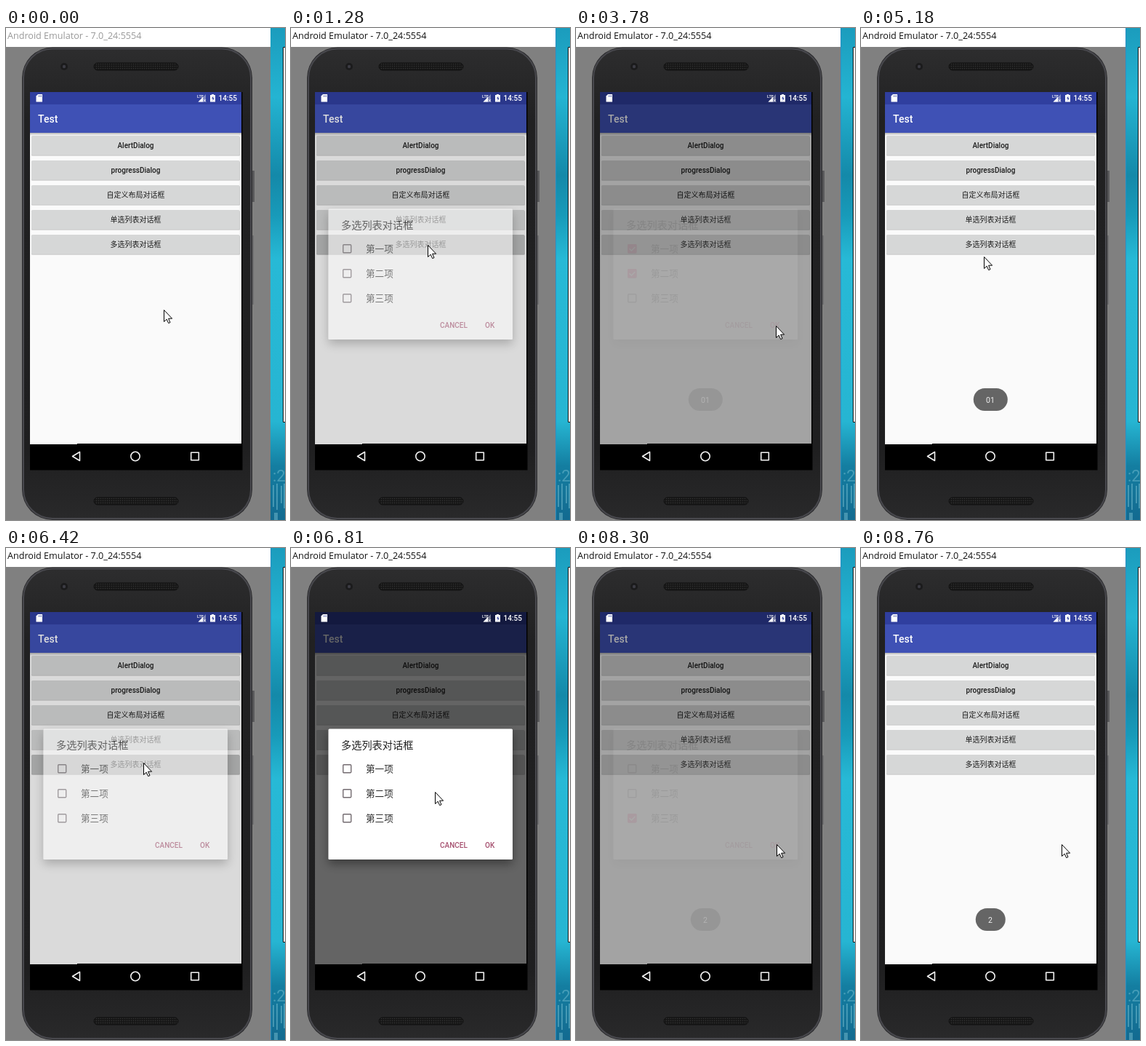
An HTML page that plays this animation: 384 by 676 pixels, repeating every 9390 ms.

```html
<!DOCTYPE html>
<html lang="zh">
<head>
<meta charset="utf-8">
<title>Dialog demo</title>
<style>
  html, body { margin: 0; width: 100%; height: 100%; overflow: hidden; background: #808080; }
  svg { display: block; width: 384px; height: 676px; font-family: Roboto, "Noto Sans CJK SC", "Noto Sans CJK", sans-serif; }
  .medium { font-weight: 500; }
  .mid { text-anchor: middle; }
</style>
</head>
<body>
<svg viewBox="0 0 384 676">
  <defs>
    <linearGradient id="sea" x2="0" y2="1">
      <stop offset="0" stop-color="#1b9cbd"/>
      <stop offset=".14" stop-color="#24b4d2"/>
      <stop offset=".3" stop-color="#1489a9"/>
      <stop offset=".38" stop-color="#189ab9"/>
      <stop offset=".47" stop-color="#27b9d6"/>
      <stop offset=".8" stop-color="#26b5d2"/>
      <stop offset=".89" stop-color="#147ea1"/>
      <stop offset="1" stop-color="#136a90"/>
    </linearGradient>
    <linearGradient id="case" x2="0" y2="1">
      <stop offset="0" stop-color="#2d2d2e"/>
      <stop offset=".15" stop-color="#212122"/>
      <stop offset=".85" stop-color="#1f1f20"/>
      <stop offset="1" stop-color="#29292a"/>
    </linearGradient>
    <linearGradient id="barShadow" x2="0" y2="1">
      <stop offset="0" stop-opacity=".28"/>
      <stop offset="1" stop-opacity="0"/>
    </linearGradient>
    <pattern id="mesh" width="3" height="3" patternUnits="userSpaceOnUse">
      <rect width="3" height="3" fill="#161616"/>
      <circle cx="1.5" cy="1.5" r=".8" fill="#343434"/>
    </pattern>
    <filter id="lift" x="-20%" y="-20%" width="140%" height="150%">
      <feDropShadow dx="0" dy="6" stdDeviation="7" flood-opacity=".4"/>
    </filter>
  </defs>

  <!-- desktop and window -->
  <rect x="364" width="20" height="676" fill="url(#sea)"/>
  <g fill="#8fd0df" opacity=".4">
    <text x="367" y="623" font-size="22">:2</text>
    <path d="M367 628h2v30h-2zM372 626h2v36h-2zM378 629h2v24h-2zM382 626h2v34h-2zM369 666h5v10h-5z"/>
  </g>
  <path d="M384 26.5H381.5V541.5H384" fill="#fff" stroke="#111"/>
  <rect width="364" height="676" fill="#808080"/>
  <rect width="364" height="26" fill="#fff"/>
  <rect id="edge" x="364" width="1" height="676" fill="#2b8fc4"/>
  <text id="caption" x="2" y="15" font-size="12.600" font-family="Open Sans, Noto Sans, sans-serif">Android Emulator - 7.0_24:5554</text>

  <!-- phone -->
  <path d="M338 196h4v43h-4z" fill="#58585a"/>
  <path d="M338 285h3v95h-3z" fill="#6c6c6e"/>
  <rect x="22" y="26.500" width="317" height="649.500" rx="42" fill="#29292b"/>
  <rect x="24" y="28.500" width="313" height="645.500" rx="40" fill="url(#case)" stroke="#48484d" stroke-width="2"/>
  <circle cx="80" cy="53" r="5" fill="#1b1b1c"/>
  <circle cx="80" cy="53" r="2.200" fill="#3c3c44"/>
  <rect x="121" y="48" width="116" height="10" rx="5" fill="url(#mesh)" stroke="#111"/>
  <rect x="121" y="645" width="116" height="10" rx="5" fill="url(#mesh)" stroke="#111"/>

  <!-- screen -->
  <rect x="33" y="88" width="292.500" height="519.500"/>
  <path d="M33 88H324V571H98V572H33Z" fill="#fafafa"/>
  <rect x="33" y="144" width="291" height="4" fill="url(#barShadow)"/>
  <rect x="33" y="105" width="291" height="39" fill="#3f51b5"/>
  <rect x="33" y="88" width="291" height="17" fill="#303f9f"/>
  <text x="44" y="130" font-size="14" fill="#fff" class="medium">Test</text>
  <g id="buttons" font-size="10" fill="#1d1d1d" class="mid medium"></g>
  <rect id="dim" x="33" y="88" width="291" height="484"/>
  <g fill="#fff">
    <path d="M44 91h6v10.500h-8.500v-8z"/>
    <path d="M45 92.500v2M46.800 92.500v2M48.500 92.500v2" stroke="#303f9f" stroke-width=".8"/>
    <text x="263" y="95.500" font-size="5.500" class="medium">LTE</text>
    <path d="M275 91v10.500h-10.500z" opacity=".4"/>
    <path d="M271 95v6.500h-6.500z"/>
    <path d="M272 98l3 3.500M275 98l-3 3.500" stroke="#fff" stroke-width=".8"/>
    <path d="M283 91h3v1h2v9.500h-7v-9.500h2z"/>
    <path d="M285.200 93.500l-2 3.500h1.400v3l2-3.800h-1.400z" fill="#303f9f"/>
    <text x="292.500" y="100" font-size="10" class="medium">14:55</text>
  </g>
  <g fill="none" stroke="#f4f4f4" stroke-width="1.600" stroke-linejoin="round">
    <path d="M91.500 588.500l10-6v12z"/>
    <circle cx="178" cy="588.500" r="6.200"/>
    <rect x="254.700" y="583.200" width="10.600" height="10.600"/>
  </g>

  <!-- dialog -->
  <g id="dialog">
    <rect x="51.500" y="248.500" width="253.500" height="179.500" rx="1.500" fill="#fff" filter="url(#lift)"/>
    <rect id="touched" x="52" y="286" width="253" height="34" fill="#fafafa"/>
    <text x="69" y="276" font-size="14.200" fill="#222">多选列表对话框</text>
    <g id="rows" font-size="12.600" fill="#2a2a2a"></g>
    <g font-size="10" class="medium" fill="#a6506f">
      <text x="205" y="412">CANCEL</text>
      <text id="ok" x="267" y="412">OK</text>
    </g>
  </g>

  <g id="toast">
    <rect id="pill" y="495" height="31" rx="15.500" fill="#656565"/>
    <text id="message" x="178" y="514.500" font-size="10.500" fill="#f2f2f2" class="mid"></text>
  </g>
  <path id="cursor" d="M.5 .5V16.500L4.200 13.200L6.700 18.600L9 17.600L6.600 12.200H11.600Z" fill="#fff" stroke="#000" stroke-linejoin="round"/>
</svg>

<script>
const LOOP = 9390;
const $ = id => document.getElementById(id);
const clamp = v => Math.max(0, Math.min(1, v));

const bursts = [
  [110, 980, 12], [1210, 1920, 10], [2070, 2530, 7], [2700, 3480, 11],
  [3780, 4080, 5], [4540, 5010, 7], [5180, 5330, 3], [5480, 6250, 11],
  [6420, 6890, 7], [7120, 7910, 11], [8230, 8610, 6], [8760, 8760, 1]
];

// Pointer path: time, x, y
const pointer = [
  [0, 217, 387], [60, 217, 387], [450, 205, 345], [820, 188, 298], [1300, 188, 298],
  [1560, 224, 344], [1850, 199, 304], [2070, 199, 304], [2530, 155, 335],
  [2780, 155, 337], [3250, 262, 415], [3480, 275, 409], [4500, 275, 409],
  [4620, 268, 423], [4900, 160, 338], [5010, 177, 320], [5180, 169, 314],
  [5330, 164, 304], [5480, 166, 303], [5900, 189, 295], [6500, 189, 295],
  [6880, 203, 360], [7200, 203, 362], [7650, 268, 411], [7800, 276, 407], [LOOP, 276, 407]
];

const sessions = [
  { open: 1210, close: 3780, checks: [2070, 2700, Infinity], ok: 3400 },
  { open: 6420, close: 8230, checks: [Infinity, Infinity, 7120], ok: 7750 }
];
const toasts = [
  { text: "01", width: 47, start: 3780, rise: 300, end: 5750 },
  { text: "2", width: 41, start: 8230, rise: 500, end: Infinity }
];

$("buttons").innerHTML = ["AlertDialog", "progressDialog", "自定义布局对话框", "单选列表对话框", "多选列表对话框"]
  .map((label, i) => `<g transform="translate(0 ${148 + 34 * i})">
    <rect x="35" y="1" width="287" height="26.800" rx="1.500" opacity=".2"/>
    <rect x="35" width="286.500" height="26.500" rx="1.500" fill="#d6d7d7"/>
    <text x="178.500" y="17.200">${label}</text></g>`).join("")
  + `<rect id="press" x="35" y="284" width="286.500" height="27.500" rx="1.500" fill="#000"/>`;

$("rows").innerHTML = ["第一项", "第二项", "第三项"]
  .map((label, i) => `<g transform="translate(71 ${297 + 34 * i})">
    <rect x=".7" y=".7" width="11" height="11" rx="1" fill="none" stroke="#736b70" stroke-width="1.400"/>
    <g class="tick"><rect width="12.500" height="12.500" rx="1.500" fill="#ff4081"/>
    <path d="M2.500 6.300l2.800 2.800 5-5.200" fill="none" stroke="#fff" stroke-width="1.400"/></g>
    <text x="32" y="10.800">${label}</text></g>`).join("");
const ticks = document.querySelectorAll(".tick");

function snap(t) {
  const burst = bursts.findLast(b => b[0] <= t);
  if (!burst) return 0;
  const [start, end, count] = burst;
  if (t >= end) return end;
  const step = (end - start) / (count - 1);
  return start + Math.floor((t - start) / step + 1e-6) * step;
}

function pointerAt(t) {
  const i = pointer.findLastIndex(k => k[0] <= t);
  const a = pointer[i], b = pointer[i + 1] || a;
  const p = (t - a[0]) / (b[0] - a[0] || 1);
  return [1, 2].map(j => a[j] + (b[j] - a[j]) * p);
}

function drawDialog(t) {
  const s = sessions.findLast(s => s.open <= t);
  let dim = 0, alpha = 0, press = 0;
  if (s && t < s.close) {
    dim = Math.min(.6, .13 + (t - s.open) / 500);
    alpha = clamp(.56 + (t - s.open) / 220);
    press = clamp(.12 - (t - s.open) / 3000);
  } else if (s) {
    dim = clamp(.35 - (t - s.close) / 640);
    alpha = clamp(.07 - (t - s.close) / 1500);
  }
  $("dim").style.opacity = dim;
  $("dialog").style.opacity = alpha;
  $("press").style.opacity = press;
  if (!s) return;
  ticks.forEach((tick, i) => tick.style.opacity = clamp((t - s.checks[i] + 80) / 240));
  $("touched").style.opacity = s === sessions[0] && t > 1800 ? 1 : 0;
  $("ok").setAttribute("fill", t > s.ok ? "#e8407c" : "#a6506f");
}

function drawToast(t) {
  const toast = toasts.findLast(s => s.start <= t);
  $("toast").style.opacity = toast
    ? Math.min(clamp(.2 + .8 * (t - toast.start) / toast.rise), clamp(1 - (t - toast.end) / 450)) : 0;
  if (!toast) return;
  $("message").textContent = toast.text;
  $("pill").setAttribute("width", toast.width);
  $("pill").setAttribute("x", 178.300 - toast.width / 2);
}

const origin = performance.now();
function draw() {
  const t = snap((performance.now() - origin) % LOOP);
  const active = t > 850;
  $("caption").setAttribute("fill", active ? "#111" : "#999");
  $("edge").style.opacity = active ? 1 : 0;
  $("cursor").setAttribute("transform", `translate(${pointerAt(t).map(Math.round)})`);
  drawDialog(t);
  drawToast(t);
  requestAnimationFrame(draw);
}
draw();
</script>
</body>
</html>
```
